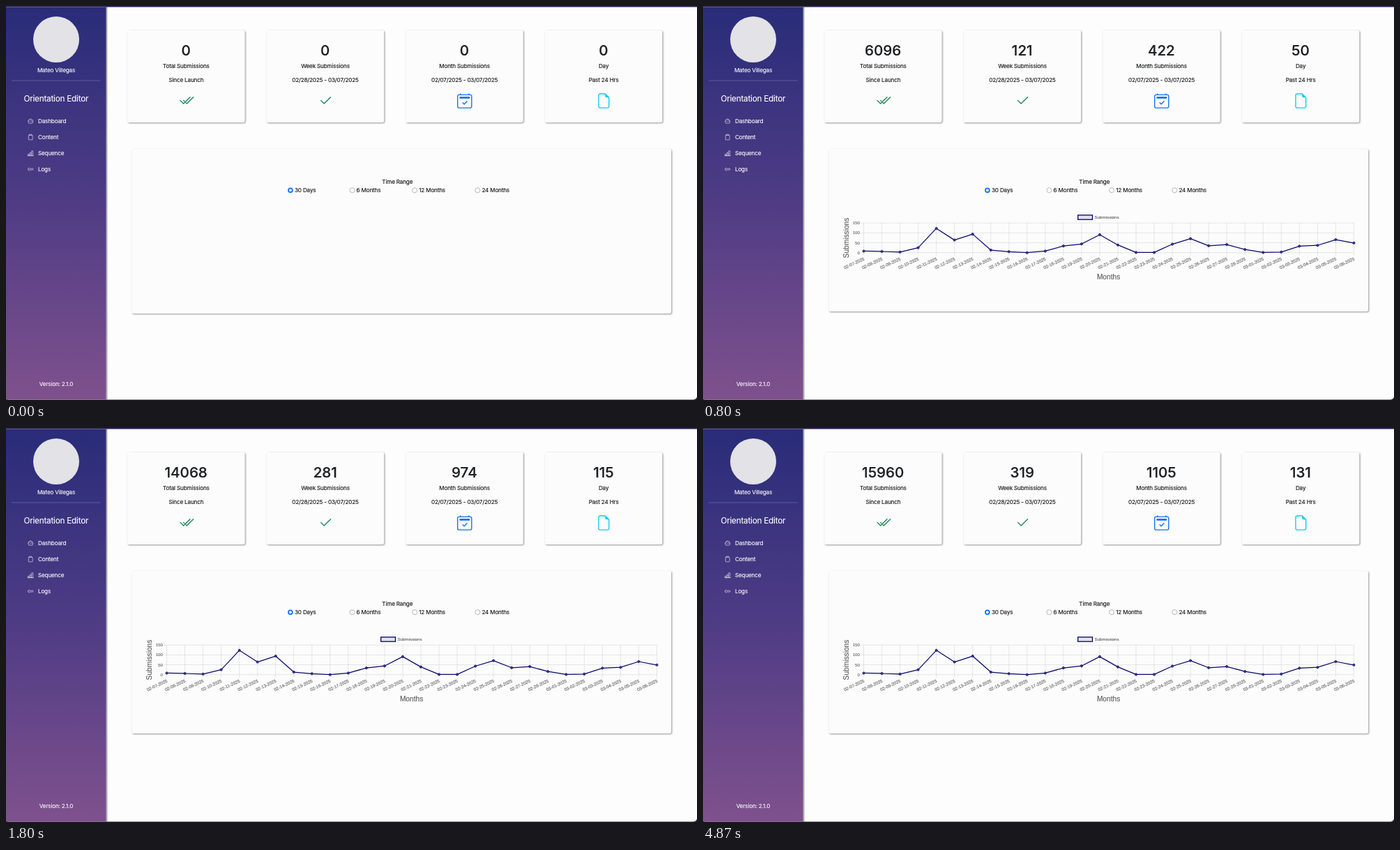
Recreate the animation shown at these times as an HTML page. Size 991x565 px, loop 4.91 s.

```html
<!DOCTYPE html>
<html lang="en">
<head>
<meta charset="utf-8">
<title>Submissions dashboard</title>
<style>
  html, body { margin: 0; width: 100%; height: 100%; overflow: hidden; background: #2f1c50; }
  svg { display: block; width: 100vw; height: 100vh; }
  text { font-family: Inter, "Open Sans", sans-serif; font-size: 8.12px; letter-spacing: -.02em;
    fill: #101214; stroke: #101214; stroke-width: .12px; }
  .mid { text-anchor: middle; }
  .side text { fill: #fff; stroke: #fff; }
  .side .head { font-size: 11.75px; }
  .count { font-size: 20.6px; font-weight: 500; letter-spacing: 0; fill: #1c1f22; stroke-width: .2px; }
  .card { fill: #fcfcfc; filter: drop-shadow(1.1px 1.2px .9px rgba(0, 0, 0, .42)); }
  .line { fill: none; stroke: currentColor; stroke-linecap: round; stroke-linejoin: round; }
  #chart text { font-family: "Liberation Sans", Arial, sans-serif; font-size: 6.2px; letter-spacing: 0;
    fill: #555; stroke: #555; stroke-width: .08px; }
  #chart .title { font-size: 10.2px; }
  .end { text-anchor: end; }
</style>
</head>
<body>
<svg viewBox="0 0 991 565" preserveAspectRatio="none">
  <defs>
    <linearGradient id="dusk" x1="0" y1="0" x2="0" y2="1">
      <stop offset="0" stop-color="#292c79"/>
      <stop offset=".5" stop-color="#4f3c85"/>
      <stop offset="1" stop-color="#7f518d"/>
    </linearGradient>
    <linearGradient id="edge">
      <stop offset="0" stop-color="#000" stop-opacity=".45"/>
      <stop offset="1" stop-color="#000" stop-opacity="0"/>
    </linearGradient>
    <clipPath id="window"><path d="M0 1.5H991V559.5a5 5 0 0 1-5 5H3a3 3 0 0 1-3-3z"/></clipPath>
  </defs>

  <rect y="555" width="991" height="10" fill="#25222b"/>
  <g clip-path="url(#window)">
    <rect width="991" height="565" fill="#fdfdfd"/>
    <rect x="143.500" width="3" height="565" fill="url(#edge)"/>
    <rect width="143.600" height="565" fill="url(#dusk)"/>
  </g>

  <g class="side">
    <circle cx="72" cy="48" r="33" fill="#e3e2e6"/>
    <text class="mid" x="72" y="95">Mateo Villegas</text>
    <path d="M8 107H135.500" stroke="#fff" stroke-opacity=".25" stroke-width=".8"/>
    <text class="mid head" x="71.800" y="137.300">Orientation Editor</text>
    <g id="menu" color="#e6e4ee"></g>
    <text class="mid" x="72" y="544.900">Version: 2.1.0</text>
  </g>

  <g id="cards"></g>

  <rect id="panel" class="card" x="180.300" y="205" width="773.800" height="236" rx="2.500"/>
  <text class="mid" x="561.300" y="254.900">Time Range</text>
  <g id="ranges"></g>

  <g id="chart">
    <rect x="537.700" y="299.900" width="20.800" height="6.300" fill="#e2e2e6" stroke="#000075" stroke-width="1.300"/>
    <text x="561.500" y="305.100">Submissions</text>
    <text class="title mid" x="581.600" y="392.100">Months</text>
    <text class="title mid" transform="translate(208.700 332.500) rotate(-90)">Submissions</text>
    <g id="axes"></g>
    <path id="plot" fill="none" stroke="#08086e" stroke-width="1.250" stroke-linejoin="round"/>
    <g id="dots"></g>
  </g>
</svg>

<script>
const LOOP = 4910;
const $ = id => document.getElementById(id);
const lerp = (a, b, k) => a + (b - a) * k;

// Sidebar menu, icons on a 16-unit grid
const menu = [
  ['Dashboard', '<path class="line" d="M2.500 13.500a6.800 6.800 0 1 1 11 0zM8 10l3.200-3.600M8 4v1M3 9h1M12 9h1M4.600 5.600l.6.6"/>'],
  ['Content', '<path class="line" d="M5 2.500H3.500a1 1 0 0 0-1 1v11a1 1 0 0 0 1 1h9a1 1 0 0 0 1-1v-11a1 1 0 0 0-1-1H11M5.500 1h5v2.500h-5z"/>'],
  ['Sequence', '<path class="line" d="M1.500 11h3v4h-3zM6.500 7h3v8h-3zM11.500 2h3v13h-3zM.5 15h15"/>'],
  ['Logs', '<path class="line" d="M7 6.500a3.300 3.300 0 1 0 0 3.500h7l1.500-1.700L14 6.500zM3.500 8.300h.5"/>']
];
$('menu').innerHTML = menu.map(([name, icon], i) => {
  const y = 164.8 + i * 23.05;
  return `<g transform="translate(31 ${y - 4.2}) scale(.53)" stroke-width="1.200">${icon}</g>
    <text x="46" y="${y + 2.9}">${name}</text>`;
}).join('');

// Summary cards
const cards = [
  { total: 15960, label: 'Total Submissions', span: 'Since Launch', color: '#198754',
    icon: '<path class="line" d="M1.500 7.500L5 11l7-7M7.600 10.100l.9.900 7-7M5 7.500l.9.900"/>' },
  { total: 319, label: 'Week Submissions', span: '02/28/2025 - 03/07/2025', color: '#198754',
    icon: '<path class="line" d="M3 7.500L6.500 11l7-7"/>' },
  { total: 1105, label: 'Month Submissions', span: '02/07/2025 - 03/07/2025', color: '#0d6efd',
    icon: `<rect class="line" x=".5" y="1.500" width="15" height="14" rx="1.500"/>
      <path class="line" d="M3.500.5v1M12.500.5v1M6 10l1.500 1.500 3-3"/>
      <rect x="2.500" y="3.500" width="11" height="2" rx=".5" fill="currentColor"/>` },
  { total: 131, label: 'Day', span: 'Past 24 Hrs', color: '#0dcaf0',
    icon: `<path class="line" d="M9.500.5H4A1.500 1.500 0 0 0 2.500 2v12A1.500 1.500 0 0 0 4 15.500h8a1.500 1.500 0 0 0 1.500-1.500V4.500z"/>
      <path d="M9.500.5V3A1.500 1.500 0 0 0 11 4.500h2.500z" fill="currentColor"/>` }
];
$('cards').innerHTML = cards.map((c, i) => {
  const x = 258.4 + i * 199.57;
  return `<rect class="card" x="${x - 84.3}" y="34.700" width="168.500" height="132.400" rx="2.500"/>
    <text class="mid count" x="${x - .2}" y="70.700">0</text>
    <text class="mid" x="${x}" y="88.600">${c.label}</text>
    <text class="mid" x="${x}" y="109.100">${c.span}</text>
    <g transform="translate(${x - 10.5} 125.300) scale(1.340)" color="${c.color}">${c.icon}</g>`;
}).join('');
const counts = [...document.querySelectorAll('.count')];

// Time range radios
$('ranges').innerHTML = [['30 Days', 407.9], ['6 Months', 496.5], ['12 Months', 586.1], ['24 Months', 676.3]]
  .map(([name, x], i) => `<circle cx="${x}" cy="264.200" r="${i ? 3.5 : 2.9}" fill="#fff"
      stroke="${i ? '#a3a3a3' : '#0d6efd'}" stroke-width="${i ? .8 : 1.8}"/>
    <text x="${x + 6.1}" y="267.100">${name}</text>`).join('');

// Chart
const values = [8, 6, 3, 25, 123, 64, 94, 13, 5, 0, 8, 34, 44, 91, 39, 1, 1, 43, 71, 35, 41, 16, 1, 3, 33, 37, 66, 49];
const px = i => 230.5 + i * 26.035;
const py = v => 353.7 - v * .2835;
const dateLabel = i => {
  const d = new Date(Date.UTC(2025, 1, 7 + i)).toISOString();
  return `${d.slice(5, 10)}-2025`;
};
const grid = d => `<path d="${d}" stroke="#000" stroke-opacity=".13" stroke-width=".7"/>`;
$('axes').innerHTML =
  [0, 50, 100, 150].map(v => grid(`M226.500 ${py(v)}H${px(27)}`) +
    `<text class="end" x="225" y="${py(v) + 2.1}">${v}</text>`).join('') +
  values.map((_, i) => grid(`M${px(i)} ${py(150)}V357.800`) +
    `<text class="end" y="2.100" transform="translate(${px(i) + .5} 362.300) rotate(-25)">${dateLabel(i)}</text>`).join('');
$('dots').innerHTML = values.map((_, i) =>
  `<circle cx="${px(i)}" r="1.550" fill="#45458c" stroke="#08086e" stroke-width=".9"/>`).join('');
const dots = [...$('dots').children];

// Pace of the main counter: [tick, value], a tick being 1/30 s
const pace = [[1.1, 0], [10, 2362], [24, 6096], [37, 9536], [54, 14068], [61.1, 15960]];

function tickAt(ms) {
  const n = Math.round(ms * .03);
  return Math.round(n * 10 / 3) * 10 > ms + .01 ? n - 1 : n;
}

function countAt(tick) {
  if (tick <= pace[0][0]) return 0;
  const j = pace.findIndex(p => p[0] >= tick);
  if (j < 0) return cards[0].total;
  const [t0, v0] = pace[j - 1], [t1, v1] = pace[j];
  return Math.floor(lerp(v0, v1, (tick - t0) / (t1 - t0)) + 1e-6);
}

function render(ms) {
  const tick = tickAt(ms);
  const share = countAt(tick) / cards[0].total;
  cards.forEach((c, i) => { counts[i].textContent = Math.floor(c.total * share + 1e-6); });

  const loaded = tick >= 1;
  $('chart').style.display = loaded ? '' : 'none';
  $('panel').setAttribute('height', loaded ? 233 : 236);

  // Points rise from the baseline with a quartic ease-out
  const x = Math.min(1, Math.max(0, (tick * 100 / 3 - 36) / 1000));
  const rise = 1 - (1 - x) ** 4;
  const ys = values.map(v => py(v * rise));
  $('plot').setAttribute('d', 'M' + ys.map((y, i) => `${px(i)} ${y.toFixed(2)}`).join('L'));
  dots.forEach((dot, i) => dot.setAttribute('cy', ys[i].toFixed(2)));
}

function frame() {
  render(performance.now() % LOOP);
  requestAnimationFrame(frame);
}
render(0);
requestAnimationFrame(frame);
</script>
</body>
</html>
```
